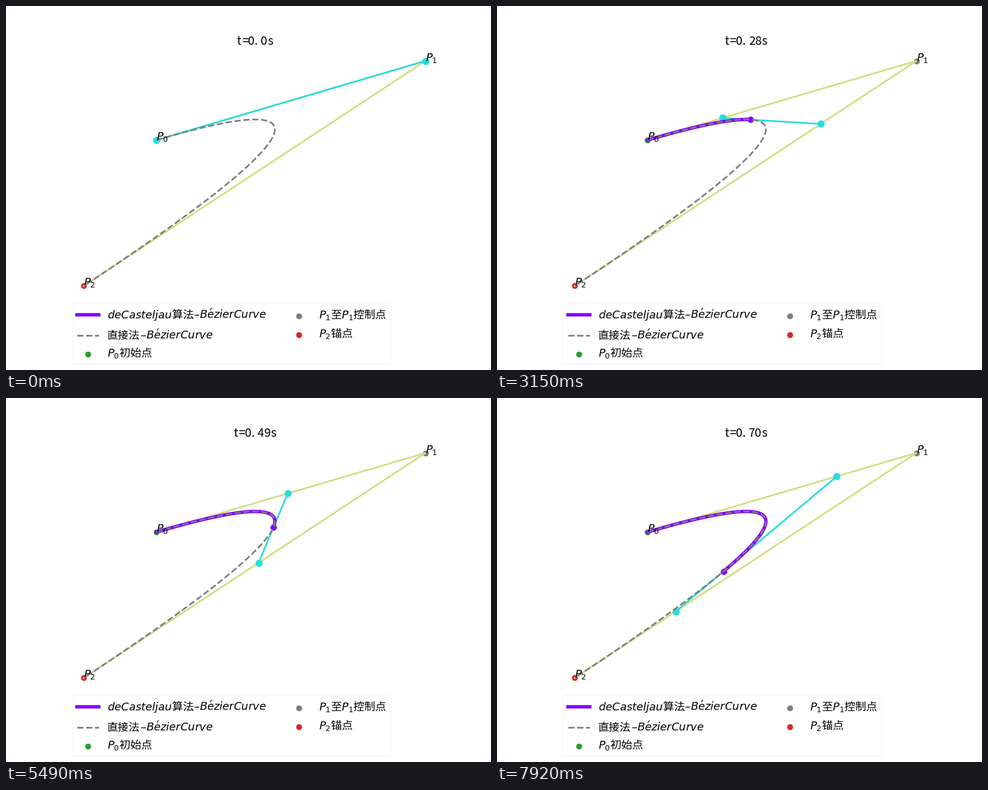
A matplotlib script that plays this animation: 800 px wide and 600 px high, repeating every 8 s.

```python
import numpy as np
import matplotlib.pyplot as plt
from matplotlib.animation import FuncAnimation
from matplotlib.patches import FancyBboxPatch

W, H, DPI = 800, 600, 100
FRAMES, LOOP_MS, STEP = 89, 8000, 0.008
CJK = "Noto Sans CJK JP"
PURPLE, CYAN, YELLOW = plt.cm.rainbow([0, 1 / 3, 2 / 3])
GRAY, GREEN, RED = "tab:gray", "tab:green", "tab:red"

# control points in stage pixels, y pointing down
P = np.array([[248.1, 221.0], [691.82, 90.55], [128.18, 461.45]])


def lerp(a, b, t):
    return a + (b - a) * t


def bezier(t):
    t = np.asarray(t, float)[..., None]
    return lerp(lerp(P[0], P[1], t), lerp(P[1], P[2], t), t)


fig = plt.figure(figsize=(W / DPI, H / DPI), dpi=DPI, facecolor="white")
ax = fig.add_axes([0, 0, 1, 1])
ax.set_xlim(0, W)
ax.set_ylim(H, 0)
ax.axis("off")


def label(x, y, s, size=13, **kw):
    return ax.text(x, y, s, fontsize=size, fontname=CJK, va="baseline", **kw)


# scene
for point, color in zip(P, (GREEN, GRAY, RED)):
    ax.scatter(*point, color=color, zorder=1)
ax.plot(*P.T, color=YELLOW, lw=2)
arm, = ax.plot([], [], "o-", color=CYAN, lw=2, ms=7.5)
trace, = ax.plot([], [], color=PURPLE, lw=4)
tip, = ax.plot([], [], "o", color=PURPLE, ms=6.5)
ax.plot(*bezier(np.linspace(0, 1, 126)).T, "--", color=GRAY, lw=2)
for k, (x, y) in enumerate(P):
    label(x, y, f"$P_{k}$")

# legend
ax.add_patch(FancyBboxPatch((109.5, 489.5), 525, 101, fc="white", ec="#f5f5f5",
                            lw=1, boxstyle="round,pad=0,rounding_size=3.6"))
ax.plot([116.7, 152.8], [509, 509], color=PURPLE, lw=4)
ax.plot([116.7, 152.8], [542.5, 542.5], "--", color=GRAY, lw=2)
for x, y, color in ((134.8, 573.5, GREEN), (483.3, 510.5, GRAY), (483.3, 541.5, RED)):
    ax.scatter(x, y, color=color, zorder=2)

CURVE = r"$B\acute{e}zierCurve$"
for y, name, dash_x in ((515.2, "$deCasteljau$算法", 314.2), (548.8, "直接法", 226.1)):
    label(167.3, y, name)
    label(dash_x, y, "–", ha="center")
    label(dash_x + 4.5, y, CURVE)
label(167.3, 578.2, "$P_0$初始点")
label(515.8, 515.2, "$P_1$至$P_1$控制点")
label(515.8, 546.2, "$P_2$锚点")

# title in half-width cells
CELL = 10.42
cells = [label(0, 63.7, "", 14, ha="center") for _ in range(7)]


def set_title(s):
    left = 410 - (len(s) - 1) / 2 * CELL
    for k, cell in enumerate(cells):
        c = s[k:k + 1]
        cell.set_text(c)
        cell.set_x(left + k * CELL - (2.5 if c == "." else 0))


def draw(i):
    t = i * STEP
    arm.set_data(*np.array([lerp(P[0], P[1], t), lerp(P[1], P[2], t)]).T)
    path = bezier(np.arange(i + 1) * STEP) if i else np.empty((0, 2))
    trace.set_data(*path.T)
    tip.set_data(*path[-1:].T)
    set_title(f"t={t:.2f}s" if i else "t=0.0s")
    return [arm, trace, tip, *cells]


anim = FuncAnimation(fig, draw, frames=FRAMES, interval=LOOP_MS / FRAMES,
                     init_func=lambda: draw(0), repeat=True, repeat_delay=0)
plt.show()
```
